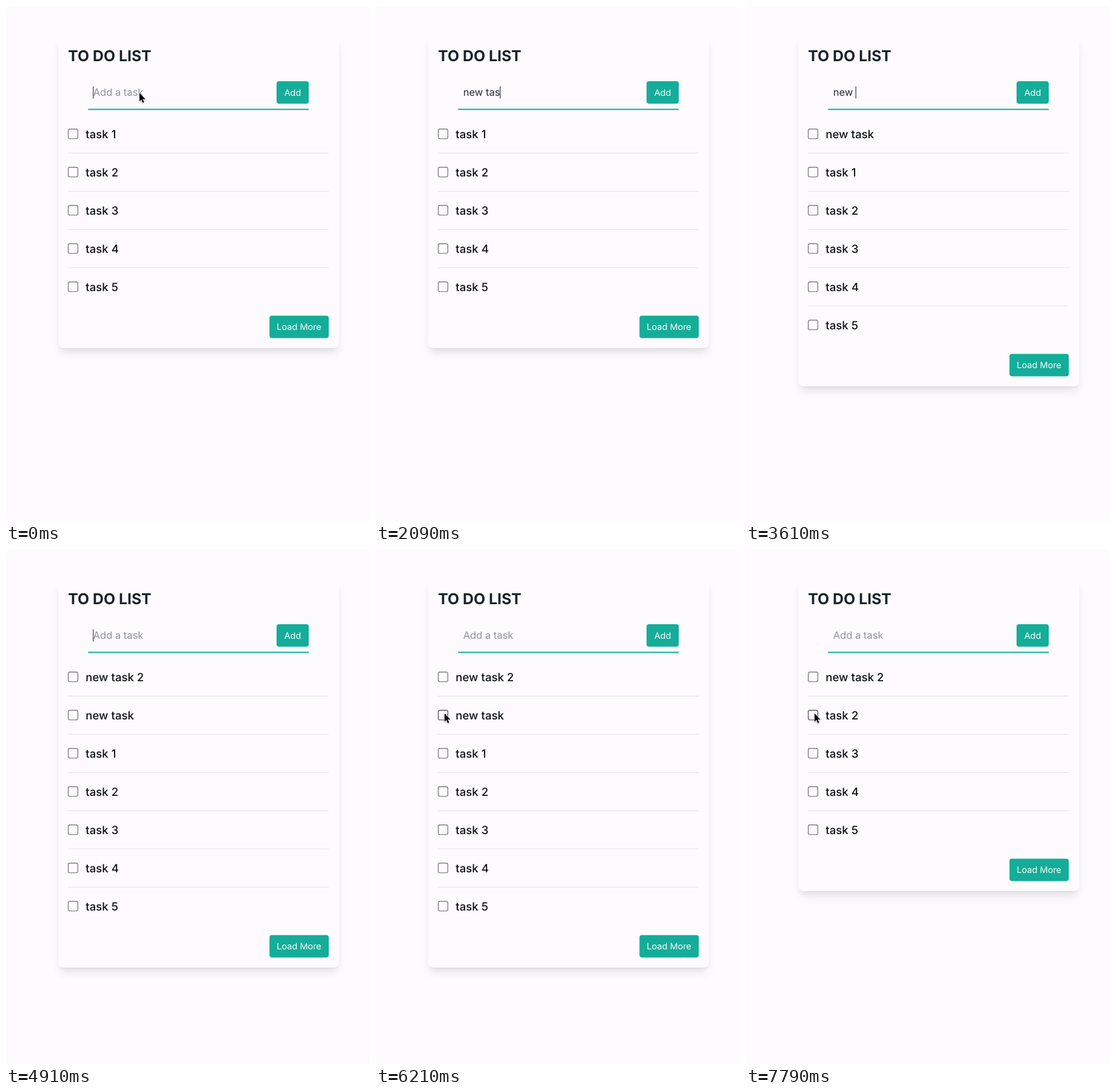
An HTML page for the animation above (7850 ms loop, 600 by 849 pixels).

```html
<!DOCTYPE html>
<html lang="en">
<head>
<meta charset="utf-8">
<title>To do list</title>
<style>
  html, body { margin: 0; width: 100%; height: 100%; overflow: hidden; background: #fdfbfe; }
  #card {
    position: absolute; left: 85.5px; top: 49px; width: 463px;
    border-radius: 8.3px; background: #fdfbfe;
    box-shadow: 0 10.3px 15.5px -3.1px rgba(0,0,0,.1), 0 4.1px 6.2px -4.1px rgba(0,0,0,.1);
  }
  svg { position: absolute; left: 0; top: 0; }
  text {
    font-family: Inter, "Liberation Sans", sans-serif; font-optical-sizing: none;
    text-rendering: geometricPrecision; white-space: pre;
  }
  .title { font-size: 24.8px; font-weight: 700; fill: #1c222b; }
  .task { font-size: 18.6px; font-weight: 500; fill: #0d1116; }
  .input { font-size: 16.53px; fill: #252a36; }
  .input.empty { fill: #8e939e; }
  .label { font-size: 14.47px; fill: #fdfbfe; text-anchor: middle; }
  .teal { fill: #14ad9a; }
  .line { fill: #e3e2e6; }
  .box { fill: #fefcff; stroke: #64666c; stroke-width: 1.1; }
  .box.hover { stroke: #3c3e44; }
  #mouse { filter: drop-shadow(0 1px 1px rgba(0,0,0,.3)); }
</style>
</head>
<body>
<div id="card"></div>
<svg width="600" height="849" viewBox="0 0 600 849">
  <text class="title" x="102.3" y="91">TO DO LIST</text>
  <rect class="teal" x="135.3" y="169.4" width="363.7" height="2.05"/>
  <rect class="teal" x="446" y="124" width="53" height="37" rx="4.1"/>
  <text class="label" x="472.5" y="147.8">Add</text>
  <text id="input" x="143.7" y="148.4"></text>
  <rect id="caret" y="132.5" width="1.1" height="20" fill="#22262e"/>
  <g id="rows"></g>
  <g id="more">
    <rect class="teal" x="434.3" y="510.4" width="97.7" height="37" rx="4.1"/>
    <text class="label" x="483.1" y="534.2">Load More</text>
  </g>
  <path id="mouse" d="M0 0V13.7L3.1 10.8L5.3 16L7.6 15L5.4 9.9H9.7Z"
        fill="#000" stroke="#fff" stroke-width="1.3" paint-order="stroke"/>
</svg>
<script>
const LOOP = 7850, ROW = 63, BLINK = 500;
const DELAY = 150; // from an action to the list's update
const $ = id => document.getElementById(id);

const entries = [
  { text: "new task", start: 1610, step: 80, enter: 2640 },
  { text: "new task 2", start: 3090, step: 150, enter: 4760 }
];
const clicks = [6330, 7370]; // each one ticks off the second task
const mouseBack = 5390;

function typedAt(t) {
  const e = entries.find(e => t >= e.start && t < e.enter);
  return e ? e.text.slice(0, Math.floor((t - e.start) / e.step) + 1) : "";
}

function caretOn(t) {
  if (typedAt(t)) return true;
  const done = entries.filter(e => t >= e.enter).pop();
  const since = done ? done.enter - 80 : 30 - BLINK;
  return t < clicks[0] && (t - since) % (2 * BLINK) < BLINK;
}

function tasksAt(t) {
  const list = [1, 2, 3, 4, 5].map(n => "task " + n);
  for (const e of entries) if (t >= e.enter + DELAY) list.unshift(e.text);
  for (const c of clicks) if (t >= c + DELAY) list.splice(1, 1);
  return list;
}

function ease(t, from, to) {
  const u = Math.min(1, Math.max(0, (t - from) / (to - from)));
  return u * u * (3 - 2 * u);
}

// From the field to the first checkbox, then down to the second.
function mouseAt(t) {
  const a = ease(t, mouseBack, 5700), b = ease(t, 5800, 6200);
  return [220 - 114 * a + 7 * b, 143.5 + 60.5 * a + 67 * b];
}

function rowMarkup(name, i, last, hover) {
  const y = i * ROW;
  return `<rect class="box${hover ? " hover" : ""}" x="102.6" y="${y + 202.9}" width="15.8" height="15.8" rx="2.4"/>
    <text class="task" x="131.3" y="${y + 217.6}">${name}</text>` +
    (last ? "" : `<rect class="line" x="102" y="${y + 242}" width="430" height="1"/>`);
}

const show = (id, on) => $(id).style.display = on ? "" : "none";
let shown = "";

function draw(t) {
  const [mx, my] = mouseAt(t), mouseOn = t < entries[0].start || t >= mouseBack;
  $("mouse").setAttribute("transform", `translate(${mx} ${my})`);
  show("mouse", mouseOn);

  const typed = typedAt(t), input = $("input");
  input.textContent = typed || "Add a task";
  input.setAttribute("class", typed ? "input" : "input empty");
  $("caret").setAttribute("x", 143.3 + (typed ? input.getComputedTextLength() : 0));
  show("caret", caretOn(t));

  const list = tasksAt(t);
  const hoverRow = mouseOn && mx < 119 ? Math.round((my - 211) / ROW) : -1;
  const markup = list.map((name, i) => rowMarkup(name, i, i === list.length - 1, i === hoverRow)).join("");
  if (markup !== shown) $("rows").innerHTML = shown = markup;

  const grow = (list.length - 5) * ROW;
  $("more").setAttribute("transform", `translate(0 ${grow})`);
  $("card").style.height = 515 + grow + "px";
}

function frame() {
  draw(performance.now() % LOOP);
  requestAnimationFrame(frame);
}
frame();
</script>
</body>
</html>
```
